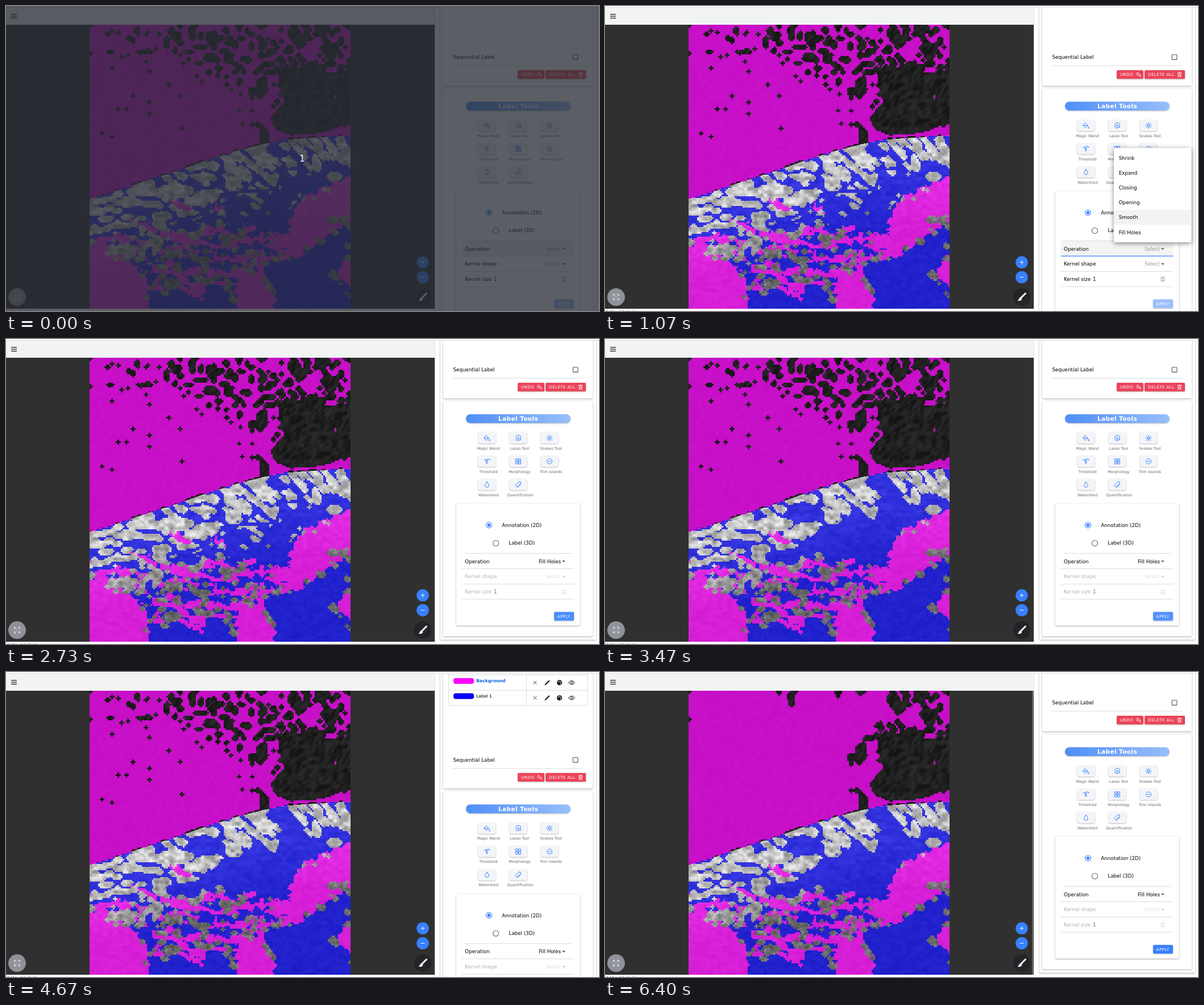
Recreate the animation shown at these times as an HTML page with a canvas. Size 1043 px wide and 537 px high, loop 7140 ms.

```html
<!DOCTYPE html>
<html lang="en">
<head>
<meta charset="utf-8">
<title>Label tools</title>
<style>
html, body { margin: 0; width: 100%; height: 100%; overflow: hidden; background: #303030; }
canvas { position: absolute; left: 147px; top: 33px; }
svg { position: absolute; left: 0; top: 0; font-family: "DejaVu Sans", sans-serif; white-space: pre; }
.card { fill: #fff; filter: drop-shadow(0 1px 1.6px #0005); }
.key { filter: drop-shadow(0 1px .8px #0004); }
</style>
</head>
<body>
<canvas id="scan" width="459" height="500"></canvas>
<svg id="ui" width="1043" height="537"></svg>
<script>
const LOOP = 7140, STEP = 200 / 3;
const BLUE = '#3880ff', RED = '#eb445a';
const clamp = (v, lo = 0, hi = 1) => Math.min(hi, Math.max(lo, v));

function along(points, x) {
  let i = 1;
  while (i < points.length - 1 && x > points[i][0]) i++;
  const [x0, y0] = points[i - 1], [x1, y1] = points[i];
  return y0 + (y1 - y0) * clamp((x - x0) / (x1 - x0));
}

// ---- Segmented scan ----
const LEFT = 147, TOP = 33, COLS = 160, ROWS = 174, CELL = 459 / COLS;
const NONE = 0, MAGENTA = 1, INDIGO = 2;
const TINT = [null, [250, 12, 250], [15, 15, 238]];
const HORIZON = [[147, 339], [185, 328], [240, 309], [300, 290], [350, 272], [400, 256], [450, 243], [490, 235], [605, 227]];

function hash(x, y, seed) {
  let h = Math.imul(x, 374761393) + Math.imul(y, 668265263) + Math.imul(seed, 1274126177) | 0;
  h = Math.imul(h ^ h >>> 13, 1274126177);
  return ((h ^ h >>> 16) >>> 0) / 2 ** 32;
}
function noise(x, y, seed) {
  const i = Math.floor(x), j = Math.floor(y), ease = f => f * f * (3 - 2 * f);
  const u = ease(x - i), v = ease(y - j);
  const row = k => hash(i, k, seed) * (1 - u) + hash(i + 1, k, seed) * u;
  return row(j) * (1 - v) + row(j + 1) * v;
}

// Channels of the sketch: red = magenta label, green = unlabelled, blue = always indigo.
function sketchRegions() {
  const c = document.createElement('canvas');
  c.width = COLS; c.height = ROWS;
  const g = c.getContext('2d', { willReadFrequently: true });
  g.fillRect(0, 0, COLS, ROWS);
  g.scale(1 / CELL, 1 / CELL);
  g.translate(-LEFT, -TOP);
  g.lineCap = g.lineJoin = 'round';
  const trace = (s, closed) => {
    g.beginPath();
    s.split(' ').forEach(p => g.lineTo(...p.split(',').map(Number)));
    if (closed) g.closePath();
  };
  const area = (color, s) => { g.fillStyle = color; trace(s, true); g.fill(); };
  const streak = (width, s) => { g.strokeStyle = '#f00'; g.lineWidth = width; trace(s); g.stroke(); };
  const patch = (x, y, rx, ry) => {
    g.fillStyle = '#0f0';
    g.beginPath(); g.ellipse(x, y, rx, ry, 0, 0, 7); g.fill();
  };

  area('#0f0', '480,110 515,112 560,120 620,114 620,202 590,208 570,215 540,222 500,224 474,214 468,196 492,168 484,140');
  area('#0f0', '430,206 445,206 460,220 458,248 448,245 448,214 432,210');
  area('#f00', '620,298 580,310 550,322 526,333 512,350 506,365 497,382 499,400 472,410 452,424 480,430 520,427 545,420 570,401 590,386 620,370');
  area('#f00', '405,474 425,464 450,460 462,482 472,500 472,540 408,540');
  area('#f00', '140,422 175,416 190,432 215,444 240,470 248,500 256,540 140,540');
  area('#f00', '620,432 598,440 588,462 580,474 592,480 620,505');
  streak(9, '220,378 262,393 300,408 342,412 372,425 410,412 450,410 478,404');
  streak(11, '292,343 322,354');
  streak(9, '364,348 380,364');
  streak(9, '160,412 205,408 250,415 275,428 320,424 340,440');
  streak(11, '255,462 300,470 350,466 396,473 450,444 520,432');
  streak(9, '262,485 300,492 330,502 342,518');
  streak(8, '350,392 395,402 430,396');
  streak(8, '368,440 410,446 440,436');
  patch(280, 384, 22, 8); patch(195, 430, 15, 5); patch(262, 416, 12, 5);
  patch(348, 447, 10, 4); patch(290, 488, 18, 6); patch(575, 472, 6, 5);
  patch(290, 437, 9, 5); patch(577, 300, 11, 6); patch(350, 336, 22, 10);
  patch(342, 481, 5, 4); patch(574, 376, 7, 4); patch(592, 379, 5, 5); patch(413, 394, 4, 4);

  const specks = '200,47 250,48 283,60 187,110 198,181 213,181 225,160 254,172 254,191 170,225 172,237 189,231 312,218 248,98 266,76 205,90 253,115 273,122 308,160 287,138 233,83 151,85 418,207 415,156 435,184 390,152 352,136';
  g.fillStyle = '#0f0';
  for (const s of specks.split(' ')) {
    const [x, y] = s.split(',').map(v => Math.floor(v / CELL) * CELL);
    g.fillRect(x - 1.5, y - 1.5, 3, 3);
  }
  g.strokeStyle = '#00f';
  g.lineWidth = 5;
  trace('380,330 420,326 474,324 488,288 520,284 524,330 498,365 462,394 390,388 380,370 345,376 286,390 284,378 335,370 374,342', true);
  g.stroke();
  return g.getImageData(0, 0, COLS, ROWS).data;
}

const around = (x, y) => [[x, y], [x - 1, y], [x + 1, y], [x, y - 1], [x, y + 1]]
  .filter(([a, b]) => a >= 0 && b >= 0 && a < COLS && b < ROWS)
  .map(([a, b]) => b * COLS + a);
const eachCell = fn => Uint8Array.from({ length: COLS * ROWS }, (_, i) => fn(i % COLS, Math.floor(i / COLS), i));

function makeLabels() {
  const sketch = sketchRegions();
  const at = (x, y, channel) =>
    sketch[(clamp(Math.round(y), 0, ROWS - 1) * COLS + clamp(Math.round(x), 0, COLS - 1)) * 4 + channel] > 110;
  const place = (x, y) => {
    const px = LEFT + (x + .5) * CELL, py = TOP + (y + .5) * CELL;
    return [px, py, py - along(HORIZON, px)];
  };
  const base = eachCell((x, y) => {
    const [px, py, depth] = place(x, y);
    const wx = x + (noise(x / 3, y / 3, 1) - .5) * 4, wy = y + (noise(x / 3, y / 3, 2) - .5) * 4;
    const mottled = px < 455 && py > 385 && py < 505 && noise(px / 15, py / 8, 9) > .7;
    return depth < 0 || at(wx, wy, 0) || mottled ? MAGENTA : INDIGO;
  });

  const seeds = eachCell((x, y, i) => {
    if (at(x, y, 1)) return noise(x / 2.5, y / 2.5, 8) < .86 ? 1 : 0;
    const [px, py, depth] = place(x, y);
    const grain = noise(x / 2.6, y / 2.6, 3);
    if (depth < 0) {
      const below = py - 35 - (px - 270) * .45;
      return depth < -18 && grain < .37 - .004 * Math.max(0, below) ? 1 : 0;
    }
    const edge = base[i] !== base[Math.min(i + 3, base.length - 1)] || base[i] !== base[Math.max(i - COLS * 3, 0)];
    if (depth > 90 && edge && grain < .25) return 1;
    if (base[i] === MAGENTA) return 0;
    const dx = px - LEFT, bent = py + .15 * dx - .0012 * dx * dx;
    const fade = .0026 + Math.max(0, px - 440) * .00006;
    const density = depth < 6 ? .36 : depth < 35 ? .52 : .41 - (depth - 35) * fade;
    return noise(px / 14, bent / 6.5, 4) < density ? 1 : 0;
  });

  // Growing every seed by a cross gives the islands their stepped outlines.
  return eachCell((x, y, i) => !at(x, y, 2) && around(x, y).some(k => seeds[k]) ? NONE : base[i]);
}

function fillHoles(labels, label, limit) {
  const out = labels.slice(), seen = new Uint8Array(labels.length);
  for (let start = 0; start < labels.length; start++) {
    if (seen[start] || labels[start] === label) continue;
    const hole = [start];
    let enclosed = true;
    seen[start] = 1;
    for (let n = 0; n < hole.length; n++) {
      const near = around(hole[n] % COLS, Math.floor(hole[n] / COLS));
      if (near.length < 5) enclosed = false;
      for (const k of near) if (!seen[k] && labels[k] !== label) { seen[k] = 1; hole.push(k); }
    }
    if (enclosed && hole.length < limit) for (const k of hole) out[k] = label;
  }
  return out;
}

const scan = document.getElementById('scan'), scanCtx = scan.getContext('2d');

const tissue = Float32Array.from({ length: scan.width * scan.height }, (_, i) => {
  const x = i % scan.width, y = Math.floor(i / scan.width);
  const depth = y + TOP - along(HORIZON, x + LEFT);
  if (depth < 0) return 31 + (noise(x / 5 + y / 9, y / 7, 6) - .5) * 26;
  const deep = clamp((depth - 60) / 100);
  return 190 - 84 * deep + (noise(x / 9, y / 6, 6) - .5) * (95 - 50 * deep) + (noise(x / 3, y / 3, 7) - .5) * 36;
});

function paintLabels(labels) {
  const image = scanCtx.createImageData(scan.width, scan.height);
  tissue.forEach((gray, i) => {
    const x = i % scan.width, y = Math.floor(i / scan.width);
    const tint = TINT[labels[Math.min(ROWS - 1, Math.floor(y / CELL)) * COLS + Math.floor(x / CELL)]];
    for (let c = 0; c < 3; c++) image.data[i * 4 + c] = tint ? tint[c] * .77 + gray * .2 : gray;
    image.data[i * 4 + 3] = 255;
  });
  return image;
}

const raw = makeLabels();
const labelFilled = fillHoles(raw, INDIGO, 110);
const allFilled = fillHoles(labelFilled, MAGENTA, 400);
const scans = [raw, labelFilled, allFilled].map(paintLabels);

// ---- Interface ----
const text = (x, y, s, size = 8.75, attrs = '') =>
  `<text x="${x}" y="${y + size * .36}" font-size="${size}" ${attrs}>${s}</text>`;
const rect = (x, y, w, h, fill, attrs = '') =>
  `<rect x="${x}" y="${y}" width="${w}" height="${h}" fill="${fill}" ${attrs}/>`;
const card = (x, y, w, h) => rect(x, y, w, h, '#fff', 'class="card" rx="2"');
const rule = (x0, x1, y, color = '#dcdcdc', w = 1) => rect(x0, y - w / 2, x1 - x0, w, color);
const circle = (x, y, r, fill, attrs = '') => `<circle cx="${x}" cy="${y}" r="${r}" fill="${fill}" ${attrs}/>`;
const icon = (x, y, d, color = '#222', w = 1, fill = 'none') =>
  `<path transform="translate(${x} ${y})" d="${d}" fill="${fill}" stroke="${color}" stroke-width="${w}" stroke-linecap="round" stroke-linejoin="round"/>`;
const button = (x, y, w, label, color, inset = 6) =>
  rect(x, y, w, 15.3, color, 'class="key" rx="2"') + text(x + inset, y + 7.7, label, 7.1, 'fill="#fff" letter-spacing=".43"');
const caret = (y, color) => icon(981, y, 'M-2.5-1.2H2.5L0 1.5Z', color, .3, color);
const spinner = (x, y) => rect(x - 4.5, y - 5, 9, 10, '#e8e8e8', 'rx="1"') + icon(x, y, 'M-2-1.5 0-3.5 2-1.5M-2 1.5 0 3.5 2 1.5', '#666', .8);

const EYE = 'M-5.5 0Q0-7 5.5 0Q0 7-5.5 0ZM2 0A2 2 0 1 1-2 0A2 2 0 1 1 2 0Z';
const CROSS = 'M-2.5-2.5 2.5 2.5M-2.5 2.5 2.5-2.5';
const PLUS = 'M-3 0H3M0-3V3';
const BRUSH = 'M5.5-5.5-1 1M-2 .5Q-4.5 1-4.5 3.5L-5.5 5Q0 5.5 0 2Z';
const TOOLS = [
  ['Magic Wand', 'M-1.5-4.5 3 0-1 4-5 0ZM-5 0H3M4.5 2Q6.5 5 4.5 5T4.5 2'],
  ['Lasso Tool', 'M-3.5 2Q-6-5 0-5T4 .5M-3.5 2V4.5M-.5-1.5V5L1.5 3.2 4.5 3Z'],
  ['Snakes Tool', 'M-4-4-2-2M0-5V-3M4-4 2-2M5 0H3M4 4 2 2M0 5V3M-4 4-2 2M-5 0H-3M2 0A2 2 0 1 1-2 0A2 2 0 1 1 2 0'],
  ['Threshold', 'M-5-2Q-4-5-2.5-3T-1 4Q1 5 1-1T3-4Q5-5 5-2M-1-4V0'],
  ['Morphology', 'M-4.5-4.5H-.8V-.8H-4.5ZM.8-4.5H4.5V-.8H.8ZM-4.5.8H-.8V4.5H-4.5ZM.8.8H4.5V4.5H.8Z'],
  ['Trim Islands', 'M4.5 0A4.5 4.5 0 1 1-4.5 0A4.5 4.5 0 1 1 4.5 0M-2 0H2'],
  ['Watershed', 'M0-5Q7 4 0 4.5Q-7 4 0-5Z'],
  ['Quantification', 'M-5 1 1-5H4V-2L-2 4ZM-2 5 5-1'],
];
const MENU = ['Shrink', 'Expand', 'Closing', 'Opening', 'Smooth', 'Fill Holes'];

const SCROLL = [[0, -275.5], [2200, -275.5], [2400, -311.5], [3670, -311.5], [3795, 0], [4400, 0], [4800, -311.5], [LOOP, -311.5]];

function labelRow(y, name, color, selected) {
  return rect(787, y - 4.5, 36, 10, color, 'rx="4" stroke="#0003" stroke-width=".5"') +
    text(827, y, name, 7.66, selected ? `font-weight="bold" fill="#0b62e0"` : '') +
    icon(930.5, y + 3.5, CROSS, '#222', .9) + icon(952, y + 3.5, 'M-4 4-3 2 3-4 4-3-2 3Z', '#111', .9, '#111') +
    circle(973.5, y + 3.5, 4.6, '#111') +
    [[-2, -1], [0, -2.6], [2.2, -1], [2, 2]].map(([a, b]) => circle(973.5 + a, y + 3.5 + b, .9, '#fff')).join('') +
    icon(995, y + 3.5, EYE, '#111', .9);
}

function labelPanel(t) {
  const backgroundOn = t >= 3930, hover = t >= 3790 && t < 4460;
  return card(764, -80, 274, 177) +
    text(815.5, 7, 'XY', 7.66, `text-anchor="middle" fill="${BLUE}" letter-spacing=".4"`) +
    text(901, 7, 'XZ', 7.66, 'text-anchor="middle" fill="#666" letter-spacing=".4"') +
    text(986, 7, 'YZ', 7.66, 'text-anchor="middle" fill="#666" letter-spacing=".4"') +
    rule(773, 858, 19.8, BLUE, 1.2) +
    icon(791, 47, 'M-4-2H4V4H-4ZM-3-4H3', '#777', .8) + rule(803, 1007, 47, '#a5c6ff', 1.2) + circle(803, 47, 3.4, BLUE) +
    rule(773, 1027, 63) + text(784, 77, 'Z', 7.2, 'fill="#888"') + text(795, 77, '0') +
    spinner(993, 76.5) + icon(1006.5, 76.5, 'M-3-3 3 3M-3 3 3-3') + rule(773, 1027, 90.5) +
    card(764, 103, 274, 738) + text(773, 117, 'Tools', 7.4, 'fill="#666"') +
    icon(809, 145, EYE, '#555') + icon(900.5, 145, BRUSH, BLUE) +
    icon(992, 145, 'M-1-1 5 5M-4-4-3-3M-1-5V-4M-5-1H-4M2-4 1-3M-4 2-3 1', '#333', 1.3) +
    rule(855, 946, 157.3, BLUE, 1.2) +
    card(769, 163, 263, 253) + button(978, 175, 42, 'ADD', BLUE, 7) + icon(1010, 182.8, PLUS, '#fff') +
    rect(778.5, 195.5, 244.5, 74, '#fff', 'stroke="#ddd"') +
    (hover ? rect(779, 216, 243.5, 27, '#eeeeee') : '') +
    rule(778, 1023, 216) + rule(778, 1023, 243) + rect(915, 195, 1, 75, '#ddd') +
    text(783, 205.5, 'Label Name', 7.66, 'font-weight="bold"') + text(920, 205.5, 'Options', 7.66, 'font-weight="bold"') +
    labelRow(226, 'Background', '#f0f', backgroundOn) + labelRow(252.8, 'Label 1', '#00f', !backgroundOn) +
    text(786.5, 365.7, 'Sequential Label') +
    rect(997.3, 361.3, 8.6, 8.6, 'none', 'stroke="#555" stroke-width="1.1" rx="1"') + rule(786, 1015, 380.5) +
    button(900, 388.5, 47, 'UNDO', RED) + icon(938, 396.2, 'M-1-4-4-1-1 2V0Q3 0 4 4Q4-2-1-2Z', '#fff', .8) +
    button(949, 388.5, 71, 'DELETE ALL', RED) +
    icon(1010.5, 396.2, 'M-3.5-2.5H3.5M-2.8-2.5-2.2 4H2.2L2.8-2.5M-1.2-2.5V-4H1.2V-2.5M-1-.5V2.5M1-.5V2.5', '#fff', .8);
}

function toolPanel(t) {
  const chosen = t >= 1860, ink = chosen ? '#000' : '#999', faint = chosen ? 'opacity=".3"' : '';
  const pressed = [3070, 5530].find(at => t >= at && t < at + 470);
  const applyHover = (t >= 2730 && t < 3730) || (t >= 5200 && t < 6200);
  const apply = !chosen ? '#9bbffc' : applyHover ? '#4a8dff' : BLUE;
  const tools = TOOLS.map(([name, d], i) => {
    const x = 846 + i % 3 * 55, y = 486 + Math.floor(i / 3) * 41;
    return rect(x - 15.5, y - 10, 31, 19.5, '#f4f5f8', 'class="key" rx="3"') + icon(x, y, d, BLUE) +
      text(x + 2.5 + (i === 7 ? 1 : 0), y + 17.7, name, 6.56, 'text-anchor="middle" fill="#666"');
  }).join('');
  return card(769, 421, 263, 414) +
    rect(809, 444, 184, 15.5, 'url(#pill)', 'rx="7.7" class="key"') +
    text(901, 451.8, 'Label Tools', 10.5, 'font-weight="bold" fill="#fff" letter-spacing=".4" text-anchor="middle"') + tools +
    card(792, 601.5, 217.5, 214.5) +
    circle(849.5, 639.2, 5, 'none', `stroke="${BLUE}" stroke-width="1.1"`) + circle(849.5, 639.2, 2.8, BLUE) +
    circle(861.5, 671, 5, 'none', 'stroke="#666" stroke-width="1.1"') +
    text(872.3, 639.2, 'Annotation (2D)') + text(884.3, 670.8, 'Label (3D)') +
    rule(806, 995, 689) +
    (chosen ? '' : rect(801.5, 689.5, 198, 26.5, '#f3f3f3')) +
    (t >= 1070 && !chosen ? rule(801.5, 999.5, 715.8, BLUE, 1.2) : rule(801.5, 999.5, 715.8)) +
    text(807, 703, 'Operation') + text(976, 703, chosen ? 'Fill Holes' : 'Select', 8.75, `text-anchor="end" fill="${ink}"`) + caret(703, '#555') +
    `<g ${faint}>` + text(807, 729.8, 'Kernel shape') + text(976, 729.8, 'Select', 8.75, 'text-anchor="end" fill="#999"') + caret(729.8, '#555') +
    text(807, 756.4, 'Kernel size') + spinner(981, 756.4) + '</g>' +
    text(858, 756.4, '1', 8.75, chosen ? 'opacity=".6"' : '') +
    rule(801.5, 999.5, 743) + rule(801.5, 999.5, 769.7) +
    button(964, 792, 35, 'APPLY', apply, 5.6) +
    (pressed ? rect(964, 792, 35, 15.3, '#fff', `rx="2" opacity="${.28 * (1 - (t - pressed) / 470)}"`) : '');
}

function menu(t) {
  if (t < 670 || t >= 1930) return '';
  const p = 1 - (1 - clamp((t - 630) / 300)) ** 3;
  const opacity = Math.min(clamp((t - 630) / 150), clamp((1960 - t) / 150));
  const scale = .8 + .2 * p, active = t < 1800 ? 4 : 5;
  return `<g opacity="${opacity}" transform="translate(1032 416) scale(${scale}) translate(-1032 -416)">` +
    rect(895, 250, 136.5, 166, '#fff', 'rx="2" style="filter:drop-shadow(0 2px 4px #0007)"') +
    rect(895, 254.4 + active * 26.15, 136.5, 26.2, '#f3f3f3') +
    MENU.map((s, i) => text(903.7, 267.6 + i * 26.15, s)).join('') + '</g>';
}

function viewerChrome(t) {
  return rect(0, 0, 754, 33, '#f2f4f4') + rect(0, 0, 1043, 2, '#fff') + rule(0, 1043, 2.4, '#d8d8d8', .8) +
    [14.6, 18, 21.4].map(y => rule(9, 19, y, '#222', 1.3)).join('') +
    rect(0, 533, 754, 4, '#fff') + text(0, 538.6, '# Voxel Labels', 7.6, 'fill="#333"') +
    (t >= 6330 ? rect(751.5, 33, 2, 500, '#777') : '') +
    circle(733, 451.3, 10.8, BLUE) + icon(733, 451.3, PLUS, '#fff') +
    circle(733, 477.5, 10.8, BLUE) + icon(733, 477.5, 'M-3 0H3', '#fff') +
    circle(733, 512.5, 15.2, '#222428') + icon(733, 512.5, 'M6.5-6.5-1 1', '#fff', 3) + icon(733, 512.5, 'M-3 1Q-5 2-5 4L-7 6Q0 7 0 3Z', '#fff', .6, '#fff') +
    circle(19.5, 512.5, 15.5, '#909299') +
    icon(19.5, 512.5, 'M-5-2V-5H-2M-5-5-1.5-1.5M2-5H5V-2M5-5 1.5-1.5M5 2V5H2M5 5 1.5 1.5M-2 5H-5V2M-5 5-1.5 1.5', '#e8e8e8', .9);
}

const DEFS = '<defs><linearGradient id="pill"><stop stop-color="#4f8ef8"/><stop offset="1" stop-color="#98bffc"/></linearGradient></defs>';

function view(t) {
  return DEFS + rect(754, 0, 289, 537, '#fff') + rect(754, 0, .8, 537, '#ddd') +
    `<g transform="translate(0 ${along(SCROLL, t)})">${labelPanel(t)}${toolPanel(t)}</g>` +
    viewerChrome(t) + menu(t) +
    (t < 70 ? rect(0, 0, 1043, 537, '#282c34', 'opacity=".76"') + text(521, 268.7, '1', 16, 'fill="#fff" text-anchor="middle"') : '');
}

const ui = document.getElementById('ui');
const began = performance.now();
let shownStep = -1, shownScan = -1;

function tick() {
  const step = Math.floor(((performance.now() - began) % LOOP + 4) / STEP);
  if (step !== shownStep) {
    shownStep = step;
    const t = step * STEP + 4, stage = t < 3400 ? 0 : t < 6070 ? 1 : 2;
    if (stage !== shownScan) scanCtx.putImageData(scans[shownScan = stage], 0, 0);
    ui.innerHTML = view(t);
  }
  requestAnimationFrame(tick);
}
tick();
</script>
</body>
</html>
```
